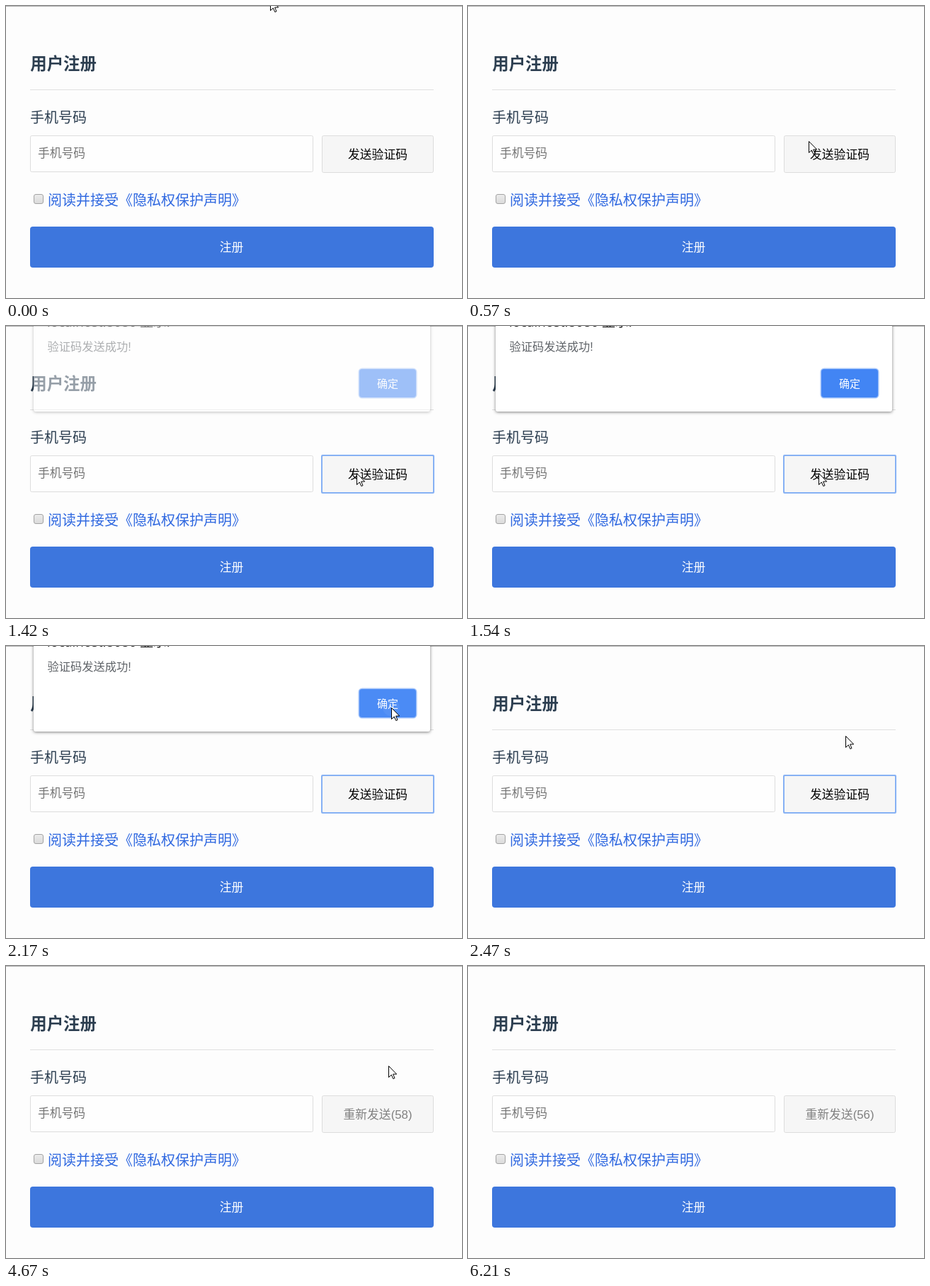
Animation, 644 px wide and 413 px high, one loop 6.8 s. Source, as an HTML page:

```html
<!DOCTYPE html>
<html lang="zh-CN">
<head>
<meta charset="utf-8">
<title>用户注册</title>
<style>
  html, body { margin: 0; width: 100%; height: 100%; overflow: hidden; background: #fdfdfd; }
  svg { display: block; width: 644px; height: 413px; }
  text { font: 16.8px "Liberation Sans", "Noto Sans CJK SC", "Noto Sans CJK", sans-serif; white-space: pre; }
  .mid { text-anchor: middle; }
  .ink { fill: #2c3e50; }
  .box { stroke: #ddd; }
  .panel { filter: drop-shadow(0 1px 2px rgba(0, 0, 0, .5)); }
</style>
</head>
<body>
<svg viewBox="0 0 644 413">
  <defs>
    <linearGradient id="check" x2="0" y2="1">
      <stop stop-color="#ececec"/><stop offset="1" stop-color="#dadada"/>
    </linearGradient>
  </defs>

  <rect width="644" height="1" fill="#b4b4b4"/>
  <text class="ink" x="34.3" y="90" style="font-size:23.4px;font-weight:700">用户注册</text>
  <rect x="34" y="118" width="570" height="1" fill="#e0e0e0"/>

  <text class="ink" x="34" y="165" style="font-size:20px">手机号码</text>
  <rect class="box" x="34.5" y="183.5" width="399" height="51" rx="2" fill="#fefefe"/>
  <text x="45" y="214" fill="#757575">手机号码</text>

  <rect class="box" x="446.5" y="183.5" width="157" height="52" rx="2" fill="#f6f6f6"/>
  <rect id="ring" x="446" y="183" width="158" height="53" rx="1" fill="none" stroke="#86b1f4" stroke-width="2"/>
  <text id="send" class="mid" x="525" y="216"></text>

  <rect x="39.5" y="266.5" width="13" height="13" rx="2.5" fill="url(#check)" stroke="#a3a3a3"/>
  <text x="59" y="282" fill="#2f68e0" style="font-size:20px">阅读并接受《隐私权保护声明》</text>

  <rect x="34" y="312" width="570" height="58" rx="4" fill="#3d76dd"/>
  <text class="mid" x="318.6" y="347" fill="#fff">注册</text>

  <g id="dialog">
    <rect class="panel" x="39" y="-40" width="560" height="161" rx="3" fill="#fff"/>
    <text x="58" y=".5" fill="#222" style="font-size:18.75px;font-family:'Open Sans','Noto Sans CJK SC',sans-serif">localhost:8080 显示:</text>
    <text x="58.5" y="34.5" fill="#5f6368" style="font-size:16.25px">验证码发送成功!</text>
    <rect id="confirm" x="499" y="61" width="80" height="40" rx="4" stroke="#a3c4fa" stroke-width="3" paint-order="stroke"/>
    <circle id="ripple" cx="544" cy="87" r="12" fill="#fff" opacity=".06"/>
    <text class="mid" x="539" y="87" fill="#fff" style="font-size:15px">确定</text>
  </g>

  <path id="cursor" d="M.5 .5V16.5L4.3 12.9L6.8 18.5L9 17.6L6.6 12H11.7Z" fill="#fff" stroke="#000" stroke-linejoin="round"/>
</svg>
<script>
  const LOOP = 6800, HOP = 120;
  const FOCUS = 1300, OPEN = 1420, PRESS = 2140, CLOSE = 2320, COUNT = 3280, SECOND = 960;

  const easeIn = p => p * p;
  const easeOut = power => p => 1 - (1 - p) ** power;
  const smooth = p => p * p * (3 - 2 * p);

  // The pointer jumps along each move in equal hops of time.
  const origin = [373, -10];
  const moves = [
    { start: 150, hops: 2, to: [384, 71], ease: easeIn },
    { start: 420, hops: 4, to: [495, 208], ease: easeOut(3) },
    { start: 1660, hops: 5, to: [544, 87], ease: smooth },
    { start: CLOSE, hops: 2, to: [533, 127], ease: smooth },
    { start: 4670, hops: 2, to: [561, 183], ease: easeIn },
    { start: 5100, hops: 3, to: [622, 440], ease: easeOut(2) }
  ];

  const el = id => document.getElementById(id);
  const [ring, send, dialog, confirmButton, ripple, cursor] =
    ['ring', 'send', 'dialog', 'confirm', 'ripple', 'cursor'].map(el);

  const show = (node, on) => node.setAttribute('visibility', on ? 'visible' : 'hidden');
  const progress = (t, start, hops) =>
    Math.min(1, Math.max(0, Math.floor((t - start) / HOP) + 1) / hops);

  function pointerAt(t) {
    return moves.reduce((from, { start, hops, to, ease }) => {
      const p = ease(progress(t, start, hops));
      return from.map((v, i) => v + (to[i] - v) * p);
    }, origin).map(Math.round);
  }

  function draw(t) {
    const [x, y] = pointerAt(t);
    const hovered = x >= 499 && x <= 579 && y >= 61 && y <= 101;
    const counting = t >= COUNT;

    cursor.setAttribute('transform', `translate(${x} ${y})`);
    dialog.setAttribute('opacity', progress(t, OPEN, 2) - progress(t, CLOSE, 2));
    confirmButton.setAttribute('fill', hovered ? '#4b8bf5' : '#4285f4');
    show(ripple, t >= PRESS && t < CLOSE);
    show(ring, t >= FOCUS && !counting);

    const label = counting ? `重新发送(${59 - Math.floor((t - COUNT) / SECOND)})` : '发送验证码';
    if (send.textContent !== label) send.textContent = label;
    send.setAttribute('fill', counting ? '#808080' : '#000');
  }

  const begin = performance.now();
  function tick() {
    draw((performance.now() - begin) % LOOP);
    requestAnimationFrame(tick);
  }
  tick();
</script>
</body>
</html>
```
